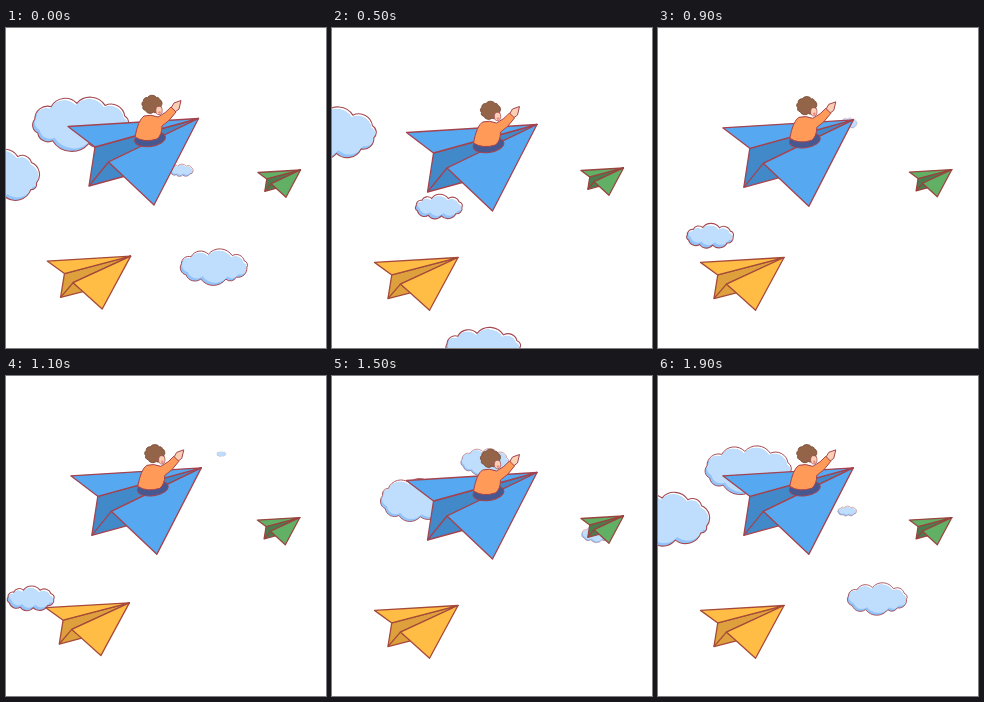
An HTML page that plays this animation: 320 px wide and 320 px high, repeating every 2 s.

```html
<!DOCTYPE html>
<html lang="en">
<head>
<meta charset="utf-8">
<title>Paper planes</title>
<style>
  html, body { margin: 0; width: 100%; height: 100%; overflow: hidden; background: #fff; }
  svg { display: block; width: 100%; height: 100%; }

  .cloud {
    animation: fly 2s steps(20) infinite, grow 2s steps(10) infinite;
    animation-delay: var(--delay);
  }
  @keyframes fly { from { translate: var(--from); } to { translate: var(--to); } }
  @keyframes grow { from { scale: 0; } 50%, to { scale: 1; } }

  /* Sways out and back in ten held poses, faster near the middle. */
  .glide { animation: glide 1s infinite; }
  @keyframes glide {
    0%, 100% { translate: 0 0; animation-timing-function: steps(3); }
    30% { translate: calc(var(--dx) * .67) calc(var(--dy) * .67); animation-timing-function: steps(2); }
    50% { translate: var(--dx) var(--dy); animation-timing-function: steps(2); }
    70% { translate: calc(var(--dx) * .67) calc(var(--dy) * .67); animation-timing-function: steps(3); }
  }

  .blue { --dx: 12.5px; --dy: 6px; --light: #56a9f1; --dark: #4189c9; --line: #a3434f; }
  .green { --dx: -3px; --dy: -2px; --light: #62b066; --dark: #4a7d4e; --line: #99443f; }
  .yellow { --dx: 6px; --dy: 6px; --light: #ffbd45; --dark: #dda03c; --line: #a5493a; animation-delay: -.8s; }

  #plane path { stroke: var(--line); stroke-width: 1.3; stroke-linejoin: round; vector-effect: non-scaling-stroke; }
  .light { fill: var(--light); }
  .dark { fill: var(--dark); }
  .child { stroke: #a3434f; stroke-linejoin: round; }
  .skin { fill: #f9d0b4; }
</style>
</head>
<body>
<svg viewBox="0 0 320 320">
  <defs>
    <!-- nose of the plane at the origin -->
    <g id="plane">
      <path class="dark" d="M0 0L-103.5 28.5L-109.5 67.5L-73 57.5L-90 43.5Z"/>
      <path class="dark" d="M-109.5 67.5L-90 43.5"/>
      <path class="light" d="M0 0L-130.5 8L-103.5 28.5Z"/>
      <path class="light" d="M0 0L-90 43.5L-44.5 86.5Z"/>
    </g>
  </defs>

  <g id="sky"></g>

  <g class="glide green">
    <use href="#plane" transform="translate(294.5 142) scale(.326 .315)"/>
  </g>
  <g class="glide yellow">
    <use href="#plane" transform="translate(122 225.5) scale(.64 .61)"/>
  </g>
  <g class="glide blue">
    <use href="#plane" transform="translate(192.5 90.5)"/>
    <g class="child">
      <ellipse cx="144" cy="111" rx="15.5" ry="7.5" fill="#46588f" transform="rotate(-8 144 111)"/>
      <path class="skin" d="M165 80L168 75L175 72.5L173 81L169 84Z"/>
      <path fill="#ff9a58" d="M138 88Q132 92 129 109Q138 115 151 111Q156 107 156 98Q163 94 170 84L165 79Q160 85 152 89Q145 86 138 88Z"/>
      <path id="hair" transform="translate(146 76.5)" fill="#946449" stroke="#74452f" stroke-width=".8"/>
      <ellipse class="skin" cx="153" cy="82.5" rx="3.2" ry="4.2" stroke-width=".7"/>
      <circle cx="153.5" cy="84.5" r="1.3" fill="#f08a80" stroke="none"/>
    </g>
  </g>
</svg>
<script>
  const clouds = [
    { start: 700, from: [227, 85.5], to: [-135, 181.5], size: [92, 54] },
    { start: 1000, from: [231, 76], to: [-82, 115], size: [105, 53] },
    { start: 1500, from: [244, 106], to: [-30, 252], size: [52, 24] },
    { start: 1100, from: [310, 94], to: [83, 416], size: [83, 38] }
  ];

  const noise = n => Math.abs(Math.sin(n * 12.9898) * 43758.5453) % 1;
  const soften = v => Math.sign(v) * Math.abs(v) ** .85;

  // A ring of outward bulging arcs that fills a box centred on the origin.
  function puffyPath([width, height], puffs, seed) {
    const inset = .4 / puffs * (width + height);
    const points = Array.from({ length: puffs }, (_, i) => {
      const angle = (i + .5 * noise(seed + i)) / puffs * 2 * Math.PI;
      return [(width / 2 - inset) * soften(Math.cos(angle)), (height / 2 - inset) * soften(Math.sin(angle))];
    });
    const arcs = points.map(([x, y], i) => {
      const [nx, ny] = points[(i + 1) % puffs];
      const r = Math.hypot(nx - x, ny - y) * .62;
      return `A${r} ${r} 0 0 1 ${nx} ${ny}`;
    });
    return `M${points[0]}${arcs.join('')}Z`;
  }

  const px = ([x, y]) => `${x}px ${y}px`;

  // White rim at the upper right, blue shade at the lower left.
  function cloudMarkup({ start, from, to, size }, i) {
    const d = puffyPath(size, 10, i * 20 + 1);
    return `<g class="cloud" style="--delay:${start - 2000}ms;--from:${px(from)};--to:${px(to)}">
      <clipPath id="clip${i}"><path d="${d}"/></clipPath>
      <g clip-path="url(#clip${i})">
        <path d="${d}" fill="#fff"/>
        <g clip-path="url(#clip${i})" transform="translate(-1 2)">
          <path d="${d}" fill="#92c4fb"/>
          <path d="${d}" fill="#bfdefe" transform="translate(3 -5)"/>
        </g>
      </g>
      <path d="${d}" fill="none" stroke="#a34a52" stroke-width="1.1"/>
    </g>`;
  }

  document.getElementById('sky').innerHTML = clouds.map(cloudMarkup).join('');
  document.getElementById('hair').setAttribute('d', puffyPath([22, 19], 9, 5));
</script>
</body>
</html>
```
